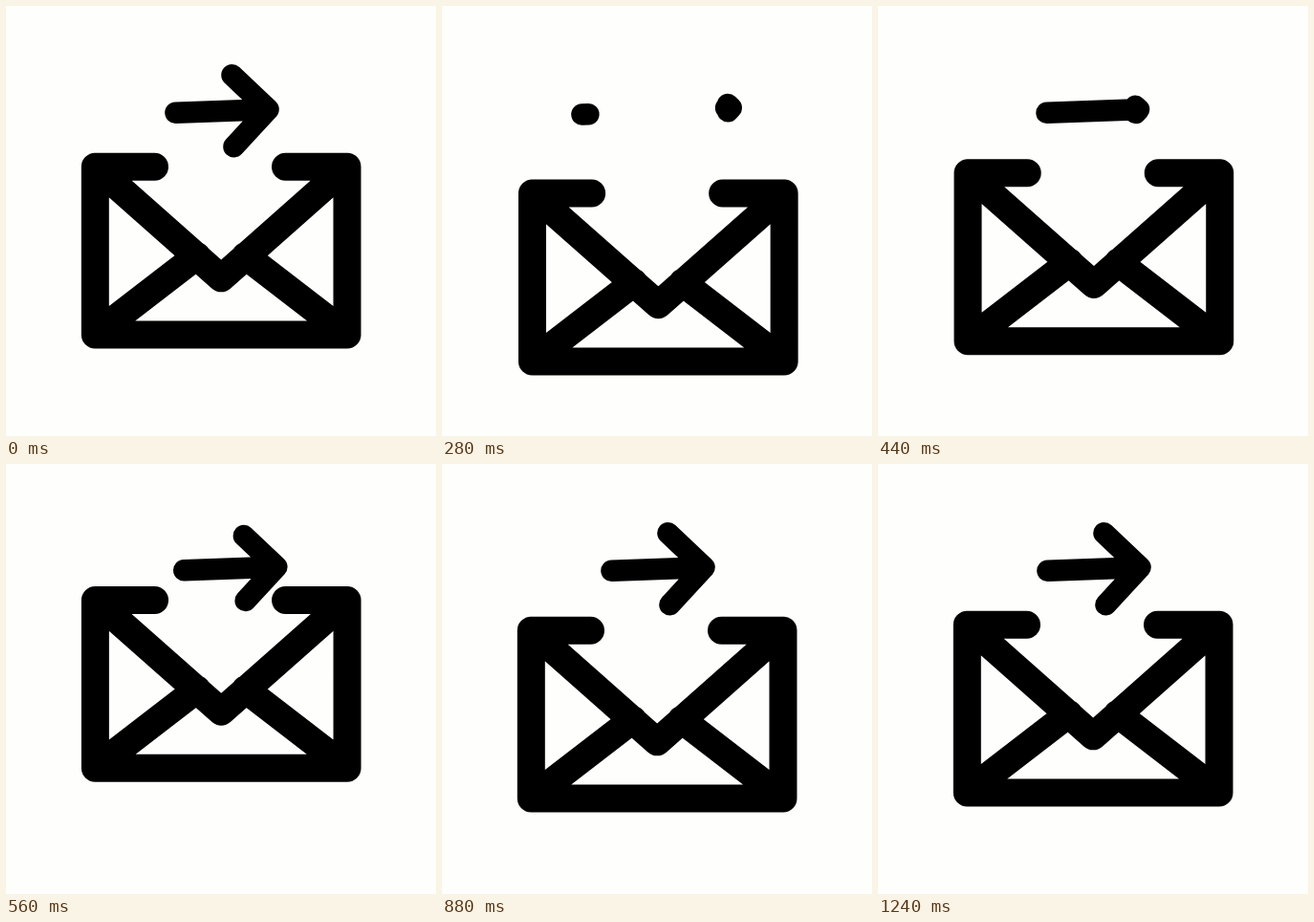
Recreate the animation shown at these times as an HTML page. Size 450 px wide and 450 px high, loop 1280 ms.

```html
<!DOCTYPE html>
<html lang="en">
<head>
<meta charset="utf-8">
<title>Send mail</title>
<style>
  html, body { margin: 0; height: 100%; overflow: hidden; background: #fefefd; }
  svg { display: block; width: 100%; height: 100%; }
  path { fill: none; stroke: #000; stroke-linecap: round; stroke-linejoin: round; }
</style>
</head>
<body>
<svg viewBox="0 0 450 450">
  <path id="mail" stroke-width="29" d="M155.5 168.2H93.3V344H357V168.2H292.5
    M93.3 168.2L225.2 284.8L357 168.2M93.3 343.6L199.8 261.6M357 343.6L250.5 261.6"/>
  <path id="arrow" stroke-width="22.6"/>
</svg>
<script>
const LOOP = 1280, STEP = 40;
const mail = document.getElementById('mail');
const arrow = document.getElementById('arrow');

// Envelope bounce: time, x, y
const bounce = [[0, 0, 0], [320, 1.2, 29], [600, 0, -28.5], [880, 0, 6], [1160, 0, 0], [LOOP, 0, 0]];

const progress = (t, a, b) => Math.min(1, Math.max(0, (t - a) / (b - a)));
const smooth = (t, a, b) => (1 - Math.cos(Math.PI * progress(t, a, b))) / 2;
const easeIn = (t, a, b) => 1 - Math.cos(Math.PI / 2 * progress(t, a, b));
const easeOut = (t, a, b) => Math.sin(Math.PI / 2 * progress(t, a, b));

function mailOffset(t) {
  const i = bounce.findIndex(key => key[0] > t);
  const [a, x0, y0] = bounce[i - 1], [b, x1, y1] = bounce[i];
  const p = smooth(t, a, b);
  return [x0 + (x1 - x0) * p, y0 + (y1 - y0) * p];
}

// Shaft runs between fractions from..to; legs scales the two head strokes.
function arrowPath(dx, from, to, legs) {
  const point = f => [177.5 + dx + 97 * f, 111.7 - 0.06 * dx - 3.5 * f];
  const [x, y] = point(to);
  let d = `M${point(from)}L${x} ${y}`;
  if (legs > 0) d += `M${x - 38 * legs} ${y - 36 * legs}L${x} ${y}L${x - 36 * legs} ${y + 39 * legs}`;
  return d;
}

function leaving(t) {
  if (t >= 320) return '';
  return arrowPath(35 * easeIn(t, 0, 320), smooth(t, 60, 320), 1, 1 - smooth(t, 120, 320));
}

function arriving(t) {
  if (t <= 240) return '';
  const dx = t < 600 ? -40 + 49 * easeOut(t, 240, 580) : 9 * (1 - smooth(t, 600, 760));
  return arrowPath(dx, 0, smooth(t, 245, 450), smooth(t, 400, 600));
}

function draw(now) {
  const time = now % LOOP, t = time - time % STEP;
  mail.setAttribute('transform', `translate(${mailOffset(t)})`);
  arrow.setAttribute('d', leaving(t) + arriving(t));
}

const start = performance.now();
function tick() {
  draw(performance.now() - start);
  requestAnimationFrame(tick);
}
tick();
</script>
</body>
</html>
```
